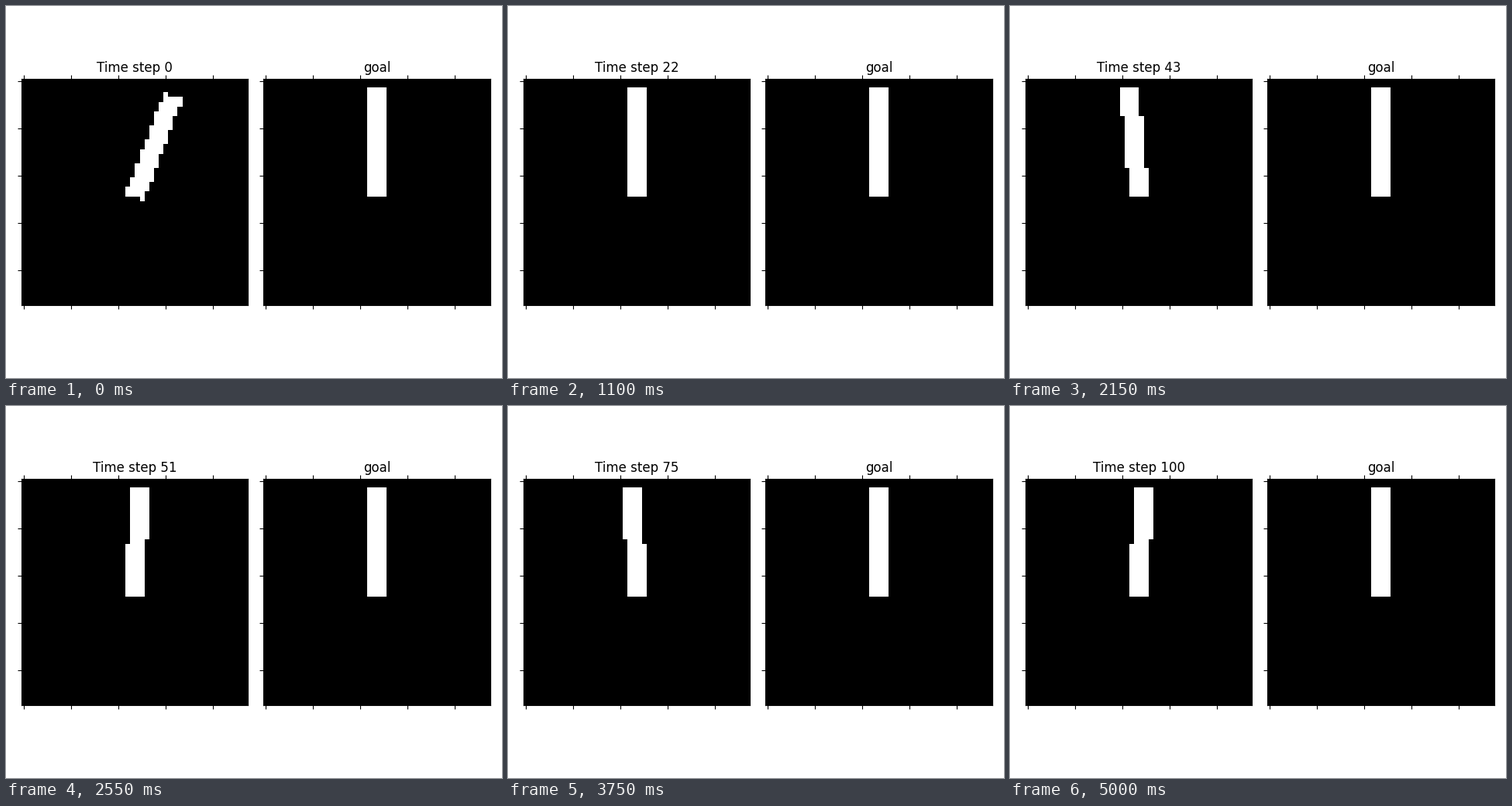
A matplotlib script for the animation above (5.05 s loop, 640x480 px).

```python
import numpy as np
import matplotlib.pyplot as plt
from matplotlib.animation import FuncAnimation

W, H, DPI = 640, 480, 100
N = 48            # image cells per side
STEPS = 101
LENGTH = 22       # pole length in cells
HALF = 1.5        # half of the pole width
PIVOT = (24, 24.7)
SIDE = 292.4      # panel side in pixels


def tip_shift(step):
    """Sideways shift of the pole tip: a fall that dies out plus a steady sway."""
    fall = 6.48 * np.exp(-step / 4)
    sway = 1.55 * np.cos(2 * np.pi * (step - 35) / 17)
    return fall + sway


def pole_corners(shift):
    s = shift / LENGTH
    c = np.sqrt(1 - s * s)
    corners = []
    for along, side in [(0, -HALF), (LENGTH, -HALF), (LENGTH, HALF), (0, HALF)]:
        x = PIVOT[0] + side * c + along * s
        y = PIVOT[1] + side * s - along * c
        corners.append((int(x), int(y)))
    return corners


def draw_pole(shift):
    """Fill the pole row by row between whole-cell corners."""
    img = np.zeros((N, N))
    pts = pole_corners(shift)
    edges = list(zip(pts, pts[1:] + pts[:1]))
    ys = [y for _, y in pts]
    for row in range(min(ys), max(ys) + 1):
        xs = []
        for (x0, y0), (x1, y1) in edges:
            if y0 == y1 == row:
                xs += [x0, x1]
            elif min(y0, y1) <= row <= max(y0, y1):
                xs.append(x0 + (x1 - x0) * (row - y0) / (y1 - y0))
        left = int(np.floor(min(xs) + 0.5))
        right = int(np.ceil(max(xs) - 0.5))
        img[row, left:right + 1] = 1
    return img


fig = plt.figure(figsize=(W / DPI, H / DPI), dpi=DPI)


def add_panel(left, shift, title):
    bottom = (H - SIDE) / 2
    ax = fig.add_axes([left / W, bottom / H, SIDE / W, SIDE / H])
    img = ax.matshow(draw_pole(shift), cmap="gray", vmin=0, vmax=1)
    ax.set_xticks(range(0, N, 10))
    ax.set_yticks(range(0, N, 10))
    ax.tick_params(labeltop=False, labelbottom=False, labelleft=False)
    return img, ax.set_title(title, y=1.0)


pole, label = add_panel(19.86, tip_shift(0), "Time step 0")
add_panel(332.3, 0, "goal")


def update(step):
    pole.set_data(draw_pole(tip_shift(step)))
    label.set_text(f"Time step {step}")
    return pole, label


anim = FuncAnimation(fig, update, frames=STEPS, interval=50, repeat=True)
plt.show()
```
